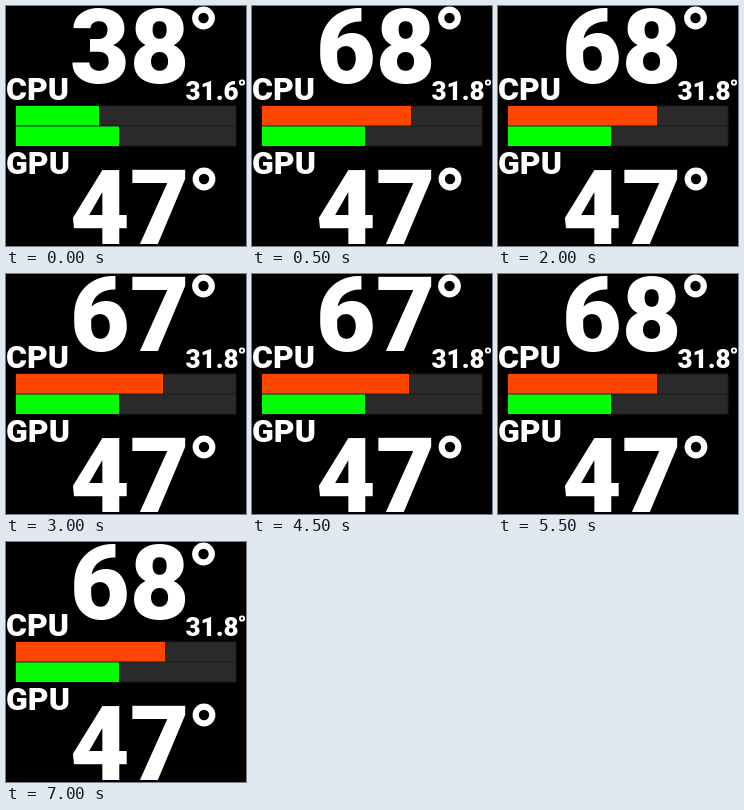
An HTML page that plays this animation: 240 px wide and 240 px high, repeating every 8 s.

```html
<!DOCTYPE html>
<html>
<head>
<meta charset="utf-8">
<style>
  html, body { margin: 0; width: 100%; height: 100%; overflow: hidden; background: #000; }
  svg { display: block; width: 240px; height: 240px; }
  text { font-family: Roboto, sans-serif; font-weight: 800; fill: #fff; }
  .big { font-size: 103px; }
  .label { font-size: 32px; }
  .small { font-size: 26px; }
  .degree { fill: none; stroke: #fff; }
  .track { fill: #2a2a2a; stroke: #1c1c1c; }
</style>
</head>
<body>
<svg viewBox="0 0 240 240">
  <text class="big" x="64" y="77" id="cpu"></text>
  <circle class="degree" cx="197.5" cy="12" r="8.3" stroke-width="6.2"/>
  <text class="label" x="0" y="94">CPU</text>
  <text class="small" x="179.5" y="94" id="room"></text>
  <circle class="degree" cx="236" cy="76.5" r="2.2" stroke-width="1.8"/>

  <rect class="track" x="10" y="100" width="220" height="20"/>
  <rect class="track" x="10" y="120" width="220" height="20"/>
  <rect x="10" y="100" height="19.5" id="cpuBar"/>
  <rect x="10" y="120.5" height="19.5" width="103" fill="#0f0"/>

  <text class="label" x="0" y="168">GPU</text>
  <text class="big" x="64" y="238">47</text>
  <circle class="degree" cx="198" cy="173" r="8.3" stroke-width="6.2"/>
</svg>
<script>
  const LOOP = 8000;
  const readings = [
    { at: 0, cpu: 38, room: "31.6" },
    { at: 500, cpu: 68, room: "31.8" },
    { at: 3000, cpu: 67, room: "31.8" },
    { at: 5500, cpu: 68, room: "31.8" },
  ];
  const byId = id => document.getElementById(id);
  const cpu = byId("cpu"), room = byId("room"), bar = byId("cpuBar");

  function draw() {
    const t = performance.now() % LOOP;
    const now = readings.findLast(r => r.at <= t);
    cpu.textContent = now.cpu;
    room.textContent = now.room;
    bar.setAttribute("width", Math.floor(now.cpu * 2.2));
    bar.setAttribute("fill", now.cpu < 60 ? "#0f0" : "#ff4500");
    requestAnimationFrame(draw);
  }
  draw();
</script>
</body>
</html>
```
